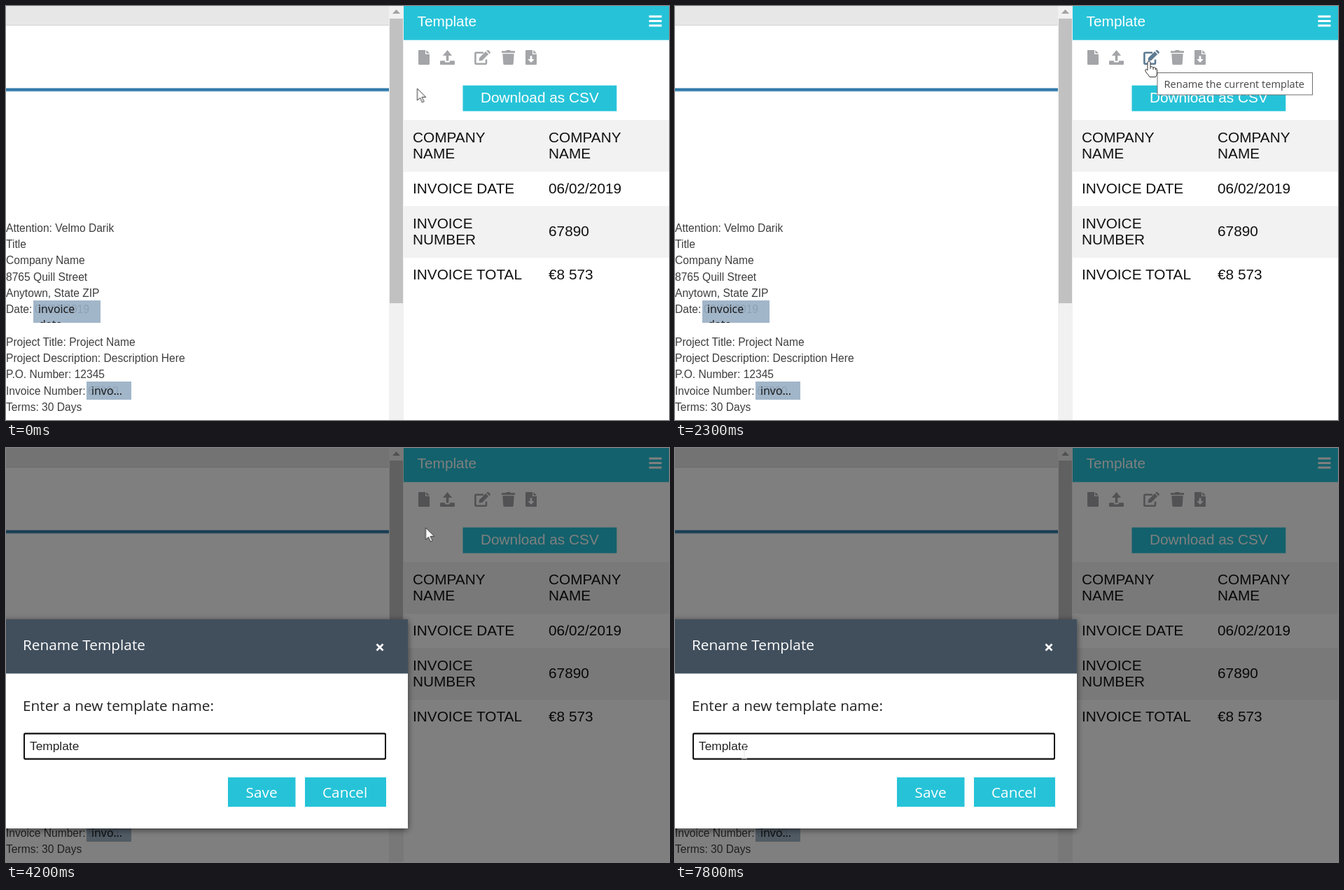
Recreate the animation shown at these times as an HTML page. Size 947 by 592 pixels, loop 8 s.

```html
<!DOCTYPE html>
<html lang="en">
<head>
<meta charset="utf-8">
<title>Rename template</title>
<style>
html, body { margin: 0; width: 100%; height: 100%; overflow: hidden; background: #fff; }
svg { display: block; width: 947px; height: 592px; }
text { white-space: pre; }
.ui { font: 20.8px "Liberation Sans", Arial, sans-serif; fill: #111; }
.doc { font: 15.6px "Liberation Sans", Arial, sans-serif; fill: #3e3e3e; }
.tag { font: 16px "Open Sans", sans-serif; fill: #151515; }
.dlg { font: 20.8px "Open Sans", sans-serif; fill: #222; }
.tip { font: 14.6px "Open Sans", sans-serif; fill: #444; }
.field { font: 17.33px "Liberation Sans", Arial, sans-serif; fill: #222; }
.ui .light, .dlg .light { fill: #fff; }
.doc .faded { fill: #8ea1b4; }
.teal { fill: #26c3d8; }
.icons { fill: #a4a5a8; }
.pen { fill: none; stroke-width: 2.6; stroke-linejoin: round; }
.modal-box { filter: drop-shadow(0 2px 5px rgba(0, 0, 0, .55)); }
.pointer { fill: #fff; stroke: #333; stroke-linejoin: round; }

/* 100 ms is 1.25% of the loop */
.edit, .tooltip, .modal, .focus, .click, .cursor, .arrow, .hand, .beam, .caret {
  animation: 8s step-end infinite;
}
.edit { animation-name: hover; }
.tooltip { animation-name: tooltip; }
.modal { animation-name: modal; }
.focus { animation-name: focus; }
.click { animation-name: click; }
.cursor { animation-name: move; }
.arrow { animation-name: arrow; }
.hand { animation-name: hand; }
.beam { animation-name: beam; }
.caret { animation-name: caret; }

@keyframes hover {
  0%, 45%, 100% { fill: #a4a5a8; stroke: #a4a5a8; }
  20% { fill: #5d7b92; stroke: #5d7b92; }
}
@keyframes tooltip { 0%, 43.75%, 100% { opacity: 0; } 28.75% { opacity: 1; } }
@keyframes modal { 0% { opacity: 0; } 45%, 100% { opacity: 1; } }
@keyframes focus { 0% { opacity: 0; } 46.25%, 100% { opacity: 1; } }
@keyframes click {
  0%, 46.25%, 100% { opacity: 0; transform: scale(1); }
  43.75% { opacity: .85; transform: scale(1.6); }
  45% { opacity: 1; transform: scale(1); }
}
@keyframes arrow { 0%, 52.5% { opacity: 1; } 20%, 60%, 100% { opacity: 0; } }
@keyframes hand { 0%, 52.5%, 100% { opacity: 0; } 20% { opacity: 1; } }
@keyframes beam { 0% { opacity: 0; } 60%, 100% { opacity: 1; } }
@keyframes caret {
  0%, 68.75%, 78.75%, 88.75%, 97.5%, 100% { opacity: 0; transform: none; }
  62.5%, 72.5%, 82.5% { opacity: 1; transform: none; }
  91.25% { opacity: 1; transform: translateX(-10px); }
}
@keyframes move {
  0% { transform: translate(587.5px, 118px); }
  13.75% { transform: translate(591px, 117px); }
  15% { transform: translate(602px, 113px); }
  16.25% { transform: translate(618px, 108px); }
  17.5% { transform: translate(637px, 102px); }
  18.75% { transform: translate(656px, 95px); }
  20% { transform: translate(671px, 88px); }
  21.25% { transform: translate(675px, 82px); }
  22.5% { transform: translate(677px, 79px); }
  52.5% { transform: translate(599.5px, 114px); }
  53.75% { transform: translate(522px, 188px); }
  55% { transform: translate(432px, 262px); }
  56.25% { transform: translate(346px, 325px); }
  57.5% { transform: translate(270px, 371px); }
  58.75% { transform: translate(210px, 402px); }
  60% { transform: translate(165px, 421px); }
  61.25% { transform: translate(138px, 431px); }
  62.5% { transform: translate(128px, 434px); }
  63.75% { transform: translate(114px, 434px); }
  65% { transform: translate(104px, 434px); }
  68.75% { transform: translate(92px, 434px); }
  70% { transform: translate(74px, 434px); }
  71.25% { transform: translate(62px, 434px); }
  72.5% { transform: translate(76px, 434px); }
  73.75% { transform: translate(92px, 434px); }
  88.75% { transform: translate(94px, 434px); }
  90% { transform: translate(97px, 434px); }
  91.25%, 100% { transform: translate(99px, 434px); }
}
</style>
</head>
<body>
<svg viewBox="0 0 947 592">
  <defs>
    <path id="sheet" d="M1 0h9v6h6v14q0 1-1 1h-14q-1 0-1-1v-19q0-1 1-1zM11.300 0l4.700 4.700h-4.700z"/>
  </defs>
  <rect width="947" height="592" fill="#fff"/>

  <!-- document -->
  <rect width="547" height="27" fill="#e7e7e7"/>
  <rect y="27" width="547" height="1" fill="#d3d3d3"/>
  <rect y="117" width="547" height="5.500" fill="#317aa9" opacity=".5"/>
  <rect y="118" width="547" height="3.500" fill="#317aa9"/>
  <g class="doc">
    <text y="322.600">Attention: Velmo Darik</text>
    <text y="345.900">Title</text>
    <text y="369.200">Company Name</text>
    <text y="392.500">8765 Quill Street</text>
    <text y="415.800">Anytown, State ZIP</text>
    <text y="439">Date:</text>
    <text y="485.700">Project Title: Project Name</text>
    <text y="509">Project Description: Description Here</text>
    <text y="532.400">P.O. Number: 12345</text>
    <text y="555.700">Invoice Number:</text>
    <text y="579">Terms: 30 Days</text>
    <rect x="39" y="421" width="96" height="32" fill="#a2b6c9"/>
    <rect x="115" y="537" width="64" height="26" fill="#a2b6c9"/>
    <text class="faded" x="41" y="439">06/02/2019</text>
    <text class="faded" x="117" y="555.700">67890</text>
  </g>
  <clipPath id="tagClip"><rect x="39" y="421" width="96" height="32"/></clipPath>
  <g class="tag">
    <g clip-path="url(#tagClip)">
      <text x="46" y="439">invoice</text>
      <text x="47" y="461">date</text>
    </g>
    <text x="122" y="555.500">invo…</text>
  </g>

  <!-- scrollbar -->
  <rect x="547" width="21" height="592" fill="#f1f1f1"/>
  <rect x="548" y="18" width="19" height="407" fill="#c1c1c1"/>
  <path d="M552 11l5.500-6 5.500 6z" fill="#a3a3a3"/>

  <!-- side panel -->
  <rect class="teal" x="568" width="379" height="48.700"/>
  <path d="M918.500 15h18M918.500 21.500h18M918.500 28h18" stroke="#fff" stroke-width="2.900"/>
  <g class="icons">
    <use href="#sheet" x="589" y="63"/>
    <path d="M630.500 63l6.600 8h-4.800v7.500h-3.600v-7.500h-4.800zM621 78.200h6v1q0 1.300 1.300 1.300h4.400q1.300 0 1.300-1.300v-1h6q1 0 1 1v3.700q0 1-1 1h-19q-1 0-1-1v-3.700q0-1 1-1z"/>
    <g class="edit">
      <path class="pen" d="M682 66.800h-10.600q-1 0-1 1v13.900q0 1 1 1h13.600q1 0 1-1v-5.200"/>
      <path stroke="none" d="M675.500 78.500l.600-4.500 9.100-9 4 4-9.100 9zM686.300 64l1-.800q1-.800 2 0l2.200 2.200q.800 1 0 2l-1 1z"/>
    </g>
    <path d="M708 64.300h6l1-1.300h5l1 1.300h6v2.700h-19zM709.300 68.300h16.400l-1 14.300q0 1.400-1.400 1.400h-11.600q-1.400 0-1.400-1.400z"/>
    <use href="#sheet" x="742" y="63"/>
    <path fill="#fff" d="M748.600 71.500h2.800v4.500h3.400l-4.800 5-4.800-5h3.400z"/>
  </g>
  <rect class="teal" x="652.500" y="113.600" width="219.800" height="36.800"/>
  <rect x="568" y="163" width="379" height="74" fill="#f2f2f2"/>
  <rect x="568" y="286" width="379" height="74" fill="#f2f2f2"/>
  <g class="ui">
    <text class="light" x="587.600" y="29">Template</text>
    <text class="light" x="678" y="138">Download as CSV</text>
    <text x="581" y="194.500">COMPANY</text>
    <text x="581" y="218">NAME</text>
    <text x="775" y="194.500">COMPANY</text>
    <text x="775" y="218">NAME</text>
    <text x="581" y="268">INVOICE DATE</text>
    <text x="775" y="268">06/02/2019</text>
    <text x="581" y="317.500">INVOICE</text>
    <text x="581" y="341">NUMBER</text>
    <text x="775" y="329">67890</text>
    <text x="581" y="391">INVOICE TOTAL</text>
    <text x="775" y="391">€8 573</text>
  </g>

  <g class="tooltip">
    <rect x="689" y="95.500" width="221.500" height="31.500" fill="#fff" stroke="#6f6f6f"/>
    <text class="tip" x="698.500" y="117">Rename the current template</text>
  </g>

  <!-- dialog -->
  <g class="modal">
    <rect width="947" height="592" opacity=".5"/>
    <rect class="modal-box" x="-20" y="245" width="594" height="299" fill="#fff"/>
    <rect y="245" width="574" height="77.500" fill="#414f5d"/>
    <path d="M529.500 280.500l9 9m0-9l-9 9" stroke="#fff" stroke-width="2.700"/>
    <rect x="25.500" y="407.500" width="517" height="38" rx="1.500" fill="#fff" stroke="#777"/>
    <rect class="focus" x="26" y="408.500" width="516" height="36" rx="2" fill="#fff" stroke="#111" stroke-width="2"/>
    <rect class="teal" x="317" y="471" width="96.500" height="42"/>
    <rect class="teal" x="427" y="471" width="116" height="42"/>
    <g class="dlg">
      <text class="light" x="24" y="288.500">Rename Template</text>
      <text x="24" y="376">Enter a new template name:</text>
      <text class="light" x="342.500" y="500">Save</text>
      <text class="light" x="452" y="500">Cancel</text>
    </g>
    <text class="field" x="34" y="432">Template</text>
  </g>
  <rect class="caret" x="104" y="418" width="1" height="18" fill="#111"/>

  <!-- pointer -->
  <g transform="translate(677 77)"><circle class="click" r="5" fill="#efb52f"/></g>
  <g class="cursor">
    <path class="pointer arrow" d="M0 0v17l4-3.700 3 6.500 2.600-1.200-3-6.300h5.500z"/>
    <g class="pointer hand">
      <path d="M-2 2a2 2 0 0 1 4 0v6q3-1 4 1 3-1 3.500 1 2 0 2 3v3q0 4-2 6.500h-8.500q-2-3.500-5-6.500-2-3-1-4 2-1 3 1z"/>
      <path fill="none" d="M2 8v3M6 9v3M9.500 10v2.500"/>
    </g>
    <path class="beam" d="M-4-9h3l1 1 1-1h3M0-8v17M-4 10h3l1-1 1 1h3" fill="none" stroke="#e9e9e9" stroke-width="1.200"/>
  </g>
</svg>
</body>
</html>
```
